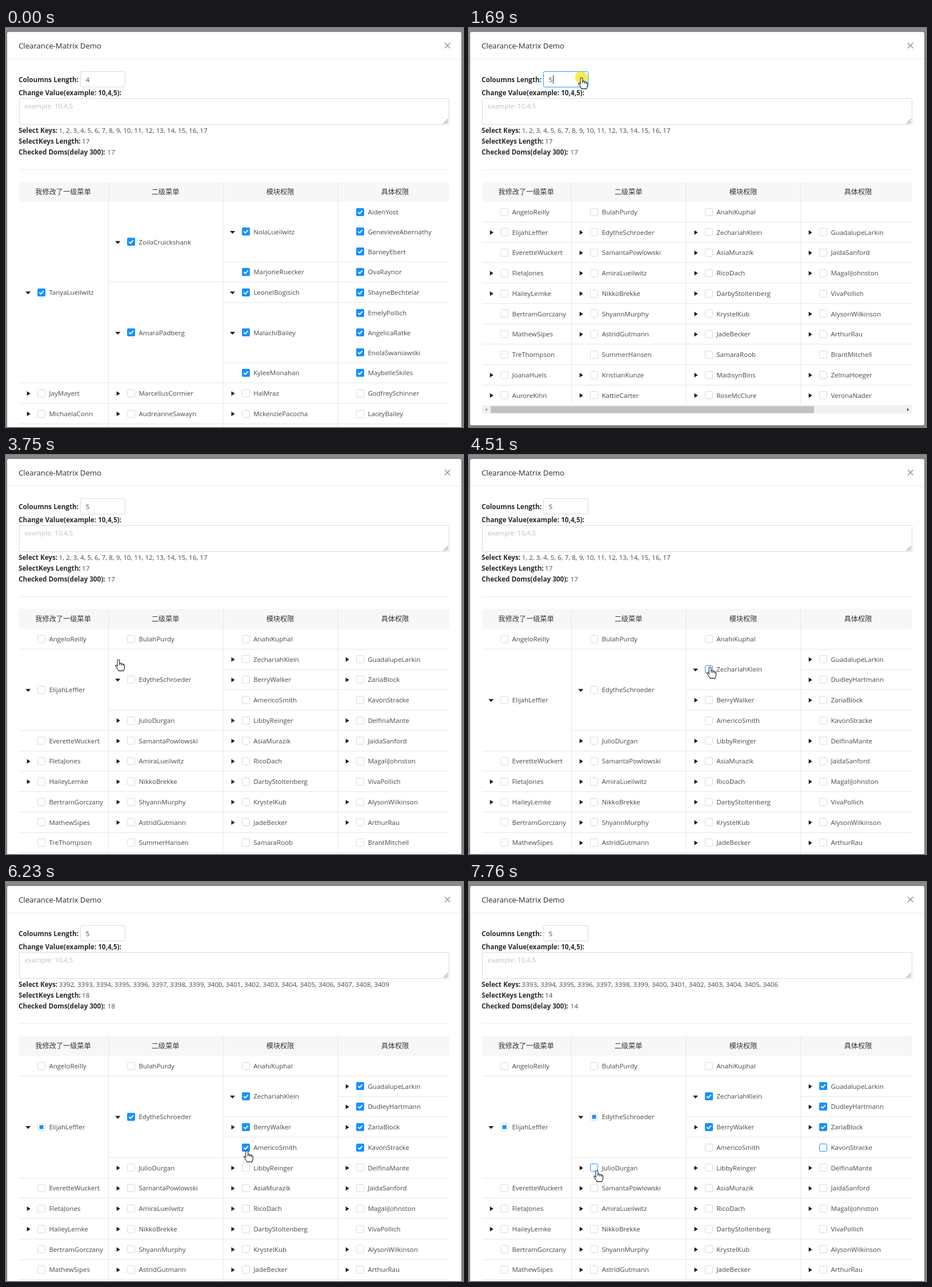
Write an HTML page with a canvas that moves like this. It is 800 by 700 pixels and loops after 8000 ms.

```html
<!DOCTYPE html>
<html lang="en">
<head>
<meta charset="utf-8">
<title>Clearance-Matrix Demo</title>
<style>
  html, body { margin: 0; width: 100%; height: 100%; overflow: hidden; background: #888; }
  canvas { display: block; }
</style>
</head>
<body>
<canvas id="stage" width="800" height="700"></canvas>
<script>
const g = document.getElementById('stage').getContext('2d');
const LOOP = 8000, BLUE = '#1890ff', LINE = '#e6e6e6', INK = '#484848';
const SANS = '"Open Sans", "Noto Sans", sans-serif';
const BODY = '11.55px ' + SANS, VALUE = '11.64px ' + SANS, BOLD = '700 11.7px ' + SANS;
const COLS = [23, 180, 380.8, 581, 776];
const HEADS = ['我修改了一级菜单', '二级菜单', '模块权限', '具体权限'];

// Row cells: '>' collapsed, 'v' expanded, '/' stacks leaves, empty continues the cell above.
const startRows = [
  'vTanyaLueilwitz|vZoilaCruickshank|vNolaLueilwitz|AidenYost/GenevieveAbernathy/BarneyEbert',
  '||MarjorieRuecker|OvaRaynor',
  '|vAmaraPadberg|vLeonelBogisich|ShayneBechtelar',
  '||vMalachiBailey|EmelyPollich/AngelicaRatke/EnolaSwaniawski',
  '||KyleeMonahan|MaybelleSkiles',
  '>JayMayert|>MarcellusCormier|>HalMraz|GodfreySchinner',
  '>MichaelaConn|>AudreanneSawayn|>MckenziePacocha|LaceyBailey',
  ' | | | '
];
const firstRow = 'AngeloReilly|BulahPurdy|AnahiKuphal| ';
const otherRows = [
  'EveretteWuckert|>SamantaPowlowski|>AsiaMurazik|>JaidaSanford',
  '>FletaJones|>AmiraLueilwitz|>RicoDach|>MagaliJohnston',
  '>HaileyLemke|>NikkoBrekke|>DarbyStoltenberg|VivaPollich',
  'BertramGorczany|>ShyannMurphy|>KrystelKub|>AlysonWilkinson',
  'MathewSipes|>AstridGutmann|>JadeBecker|>ArthurRau',
  'TreThompson|SummerHansen|SamaraRoob|BrantMitchell',
  '>JoanaHuels|>KristianKunze|>MadisynBins|>ZelmaHoeger',
  '>AuroreKihn|>KattieCarter|>RoseMcClure|>VeronaNader'
];

function rowsAt(t) {
  if (t < 1690) return startRows;
  const [a, b, c] = [3220, 3740, 4120].map(open => t < open ? '>' : 'v');
  const rows = [`${a}ElijahLeffler|${b}EdytheSchroeder|${c}ZechariahKlein|>GuadalupeLarkin`];
  if (c === 'v') rows.push('|||>DudleyHartmann');
  if (b === 'v') rows.push('||>BerryWalker|>ZariaBlock', '||AmericoSmith|KavonStracke');
  if (a === 'v') rows.push('|>JulioDurgan|>LibbyReinger|>DelfinaMante');
  return [firstRow, ...rows, ...otherRows];
}

// Times at which each box is ticked and cleared.
const ticks = {
  ZechariahKlein: [4650], GuadalupeLarkin: [4650], DudleyHartmann: [4650],
  BerryWalker: [5345], ZariaBlock: [5345],
  AmericoSmith: [5800, 7020], KavonStracke: [5800, 7020], EdytheSchroeder: [5800, 7055]
};
const isHalf = (name, t) => t > 4700 && (name === 'ElijahLeffler' ||
  name === 'EdytheSchroeder' && (t < 5800 || t > 7020));

const path = [
  [70, 300, 634], [300, 235, 260], [540, 172, 82], [1000, 178, 84], [1350, 197, 87],
  [2100, 197, 87], [2900, 47, 358], [2990, 45, 359], [3280, 45, 359], [3600, 197, 359],
  [3780, 197, 359], [4050, 397, 359], [4200, 397, 359], [4450, 422, 372], [4800, 422, 372],
  [5180, 421, 431], [5330, 421, 431], [5480, 422, 454], [5650, 420, 467], [5950, 420, 467],
  [6300, 422, 472], [6750, 619, 467], [6980, 619, 467], [7070, 595, 478], [7480, 240, 523],
  [7600, 225, 521], [7740, 224, 506]
];
const presses = [[1550, 1800], [2980, 3230], [3650, 3750], [4080, 4160],
  [4590, 4690], [5270, 5360], [5740, 5830], [6910, 7010]];

const clamp = v => Math.max(0, Math.min(1, v));
const ramp = (t, from) => clamp((t - from) / 250);
const range = (a, b) => Array.from({ length: b - a + 1 }, (_, i) => a + i).join(', ');
const step = (t, steps) => steps.filter(s => t >= s[0]).pop()[1];

function pointerAt(t) {
  const i = path.findIndex(p => p[0] > t);
  if (i < 0) return path[path.length - 1].slice(1);
  if (i === 0) return [-99, -99];
  const [t0, x0, y0] = path[i - 1], [t1, x1, y1] = path[i];
  const u = (t - t0) / (t1 - t0), e = u * u * (3 - 2 * u);
  return [x0 + (x1 - x0) * e, y0 + (y1 - y0) * e];
}

function rect(x, y, w, h, color) {
  g.fillStyle = color;
  g.fillRect(x, y, w, h);
}
function text(s, x, y, font = BODY, color = INK, align = 'left') {
  g.font = font;
  g.fillStyle = color;
  g.textAlign = align;
  g.fillText(s, x, y);
}
function frame(x, y, w, h, color, r = 2) {
  g.beginPath();
  g.roundRect(x + .5, y + .5, w - 1, h - 1, r);
  g.strokeStyle = color;
  g.lineWidth = 1;
  g.stroke();
}
function poly(points, color, width) {
  g.beginPath();
  points.forEach(([x, y]) => g.lineTo(x, y));
  if (width) {
    g.strokeStyle = color;
    g.lineWidth = width;
    g.stroke();
  } else {
    g.fillStyle = color;
    g.fill();
  }
}

function marker(kind, x, y) {
  if (kind === '>') poly([[x - 3, y - 4], [x + 3, y], [x - 3, y + 4]], '#1c1c1c');
  if (kind === 'v') poly([[x - 5.5, y - 2], [x + 3.5, y - 2], [x - 1, y + 3]], '#1c1c1c');
}

function checkbox(x, y, level, half, hot) {
  rect(x, y, 14, 14, '#fff');
  frame(x, y, 14, 14, hot ? BLUE : '#d9d9d9');
  if (level) {
    g.globalAlpha = level;
    g.beginPath();
    g.roundRect(x, y, 14, 14, 2);
    g.fillStyle = BLUE;
    g.fill();
    g.globalAlpha = half ? 0 : clamp(level * 3 - 2);
    poly([[x + 3.3, y + 7], [x + 6, y + 9.7], [x + 10.8, y + 4.3]], '#fff', 1.8);
    g.globalAlpha = 1;
  }
  if (half) rect(x + 3.5, y + 3.5, 7, 7, BLUE);
}

function item(label, left, y, t, rowIndex, [px, py]) {
  const kind = '>v'.includes(label[0]) ? label[0] : '';
  const name = label.slice(kind.length).trim();
  if (!name) return;
  const [on = 1e9, off = 1e9] = ticks[name] || [];
  const level = t < 1690 ? +(rowIndex < 5) : ramp(t, on) * (1 - ramp(t, off));
  const x = Math.round(left + 31.8), top = Math.round(y - 7.2);
  const hot = px >= x && px <= x + 14 && py >= top && py <= top + 14 ||
    name === 'KavonStracke' && t > 7020;
  marker(kind, left + 16.7, y + .3);
  checkbox(x, top, level, isHalf(name, t), hot);
  text(name, left + 52.4, y + 4);
}

function table(t, pointer) {
  rect(23, 270, 753, 35, '#f7f7f7');
  HEADS.forEach((s, c) => text(s, [100, 279, 480, 681][c], 291.7,
    '12.2px "Noto Sans CJK SC", "Noto Sans CJK", sans-serif', '#333', 'center'));
  const rows = rowsAt(t).map(r => r.split('|'));
  const tops = [305];
  rows.forEach((r, i) => tops.push(tops[i] + 34.88 * r[3].split('/').length + .87));
  rows.forEach((r, i) => r.forEach((cell, c) => {
    if (!cell) return;
    let end = i + 1;
    while (end < rows.length && !rows[end][c]) end++;
    const bottom = tops[end], names = cell.split('/');
    rect(COLS[c], Math.floor(bottom - .3), COLS[c + 1] - COLS[c], 1, LINE);
    const middle = (tops[i] + bottom) / 2 - .1;
    names.forEach((name, k) =>
      item(name, COLS[c], middle + 34.88 * (k - (names.length - 1) / 2), t, i, pointer));
  }));
  const end = tops[rows.length];
  [179, 379.6, 580.2].forEach(x => rect(x, 270, 1, end - 270, LINE));
  if (t >= 1690) scrollbar(end);
}

function scrollbar(y) {
  rect(23, y, 753, 14, '#f1f1f1');
  rect(38, y + 1, 566, 12, '#c1c1c1');
  poly([[32, y + 4], [28.5, y + 7], [32, y + 10]], '#a3a3a3');
  poly([[767, y + 4], [770.5, y + 7], [767, y + 10]], '#505050');
}

function form(t, [px, py]) {
  const focus = t > 700 && t < 3200;
  const over = (x, y, w, h) => px >= x && px <= x + w && py >= y && py <= y + h;

  text('Coloumns Length:', 22, 95, BOLD, '#2b2b2b');
  if (focus) frame(129, 75, 81, 30, 'rgba(24,144,255,.18)', 3);
  frame(130, 76, 79, 28, focus || over(130, 76, 79, 28) ? '#40a9ff' : '#d9d9d9');
  text(t < 1690 ? '4' : '5', 139.5, 95, VALUE);
  if (focus && (t + 720) % 1060 < 530) rect(147, 83, 1, 15, '#222');
  if (t > 1750 && t < 3200) {
    rect(188, 77, 1, 26, '#d9d9d9');
    rect(188, 90, 20, 1, '#d9d9d9');
    poly([[195, 86], [198.5, 82.5], [202, 86]], '#8c8c8c', 1);
    poly([[195, 95], [198.5, 98.5], [202, 95]], '#8c8c8c', 1);
  }

  text('Change Value(example: 10,4,5):', 22, 118, BOLD, '#2b2b2b');
  frame(23, 123, 753, 47, over(23, 123, 753, 46) ? '#40a9ff' : '#d9d9d9');
  text('example: 10,4,5', 32.5, 141, VALUE, '#bfbfbf');
  poly([[766, 168], [774, 160]], '#666', 1);
  poly([[770, 168], [774, 164]], '#666', 1);

  const [from, to] = step(t, [[0, [1, 17]], [4680, [3393, 3400]], [5380, [3393, 3406]],
    [5830, [3392, 3409]], [7040, [3393, 3406]]]);
  const doms = step(t, [[0, 17], [5000, 8], [5720, 14], [6170, 18], [7380, 14]]);
  [['Select Keys:', 92.5, range(from, to)],
   ['SelectKeys Length:', 133, to - from + 1],
   ['Checked Doms(delay 300):', 177.5, doms]].forEach(([label, x, value], i) => {
    text(label, 22, 184 + 19 * i, BOLD, '#2b2b2b');
    text(value, x, 184 + 19 * i, VALUE);
  });
  rect(23, 248, 753, 1, '#ebebeb');
}

const hand = new Path2D('M-2 1.6Q-2 0 0 0Q1.8 0 1.8 1.6V6.6Q4.4 5.4 5 7.4Q7.4 6.4 8 8.4' +
  'Q10.4 7.8 10.4 10V14Q10.4 17 8.6 19.6H0Q-1 17 -3.5 14Q-6 11 -5 10Q-3.6 9 -2 11.6Z');
const fingers = new Path2D('M1.8 6.6V10M5 7.4V10.4M8 8.4V11');

function pointer(t, [x, y]) {
  if (presses.some(([a, b]) => t >= a && t < b)) {
    g.beginPath();
    g.arc(x - .5, y, 10.8, 0, 7);
    g.fillStyle = 'rgba(248,232,30,.8)';
    g.fill();
  }
  g.save();
  g.translate(x, y);
  g.lineWidth = 1.1;
  g.strokeStyle = '#1a1a2a';
  const inInput = x > 130 && x < 188 && y > 76 && y < 104;
  const inArea = x > 23 && x < 776 && y > 123 && y < 170;
  if (inInput || inArea) {
    g.stroke(new Path2D('M-3 -8H3M0 -8V8M-3 8H3'));
  } else {
    g.fillStyle = '#fff';
    g.fill(hand);
    g.stroke(hand);
    g.stroke(fingers);
  }
  g.restore();
}

function dialog(t) {
  rect(0, 0, 800, 700, '#8a8a8a');
  g.save();
  g.shadowColor = 'rgba(0,0,0,.15)';
  g.shadowBlur = 11;
  g.shadowOffsetY = 4;
  g.beginPath();
  g.roundRect(2, 7, 795, t >= 1690 && t < 3220 ? 690 : 720, 3);
  g.fillStyle = '#fff';
  g.fill();
  g.restore();
  text('Clearance-Matrix Demo', 22, 35.5, '500 13.2px ' + SANS, '#2b2b2b');
  rect(2, 54, 795, 1, '#ebebeb');
  poly([[768, 26], [777.5, 35.5]], '#8c8c8c', 1.2);
  poly([[777.5, 26], [768, 35.5]], '#8c8c8c', 1.2);
}

function draw(t) {
  const at = pointerAt(t);
  dialog(t);
  form(t, at);
  table(t, at);
  pointer(t, at);
}

const start = performance.now();
function tick() {
  draw((performance.now() - start) % LOOP);
  requestAnimationFrame(tick);
}
tick();
</script>
</body>
</html>
```
